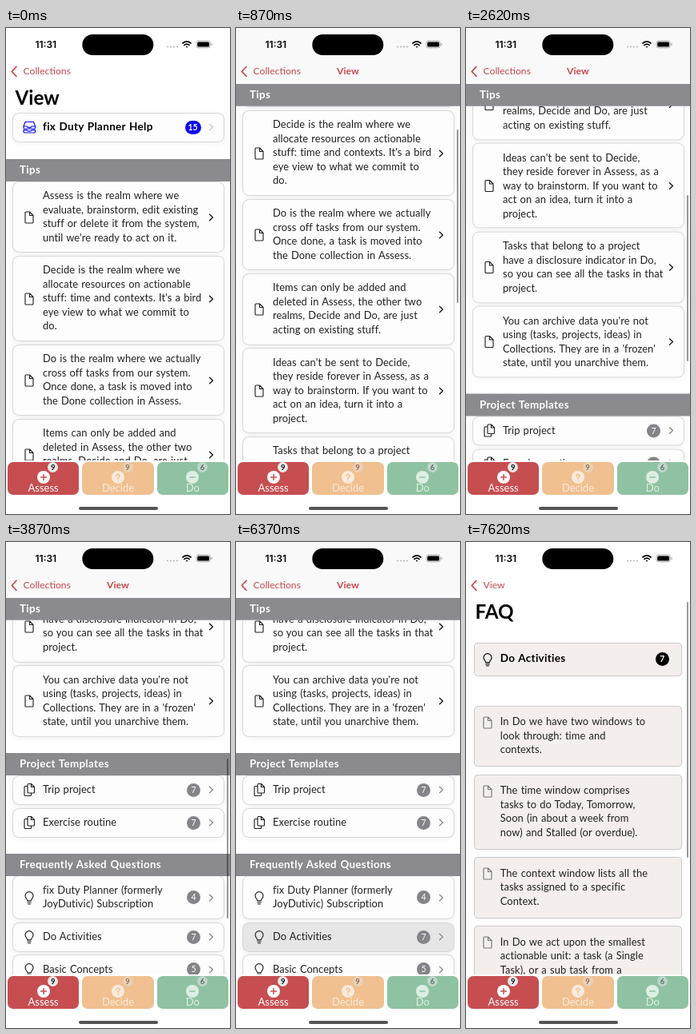
Recreate the animation shown at these times as an HTML page. Size 280 by 608 pixels, loop 8000 ms.

```html
<!DOCTYPE html>
<html lang="en">
<head>
<meta charset="utf-8">
<title>Task tips</title>
<style>
html, body { margin: 0; width: 100%; height: 100%; overflow: hidden; background: #fff; }
body { position: relative; font: 12.9px/17.5px Lato, "Open Sans", sans-serif; color: #202020; letter-spacing: .06px; word-spacing: .8px; }
body * { box-sizing: border-box; }
svg { position: absolute; overflow: visible; fill: none; stroke: currentColor; stroke-linecap: round; stroke-linejoin: round; }
.abs, .page, .bar { position: absolute; }
.page { inset: 0; width: 280px; height: 541px; overflow: hidden; background: #fff; }
.title { position: absolute; left: 11.5px; top: 72px; font: 700 24.2px/30px Lato, sans-serif; letter-spacing: 0; color: #000; }
#rows { padding-top: 107px; }
.card { position: relative; margin: 0 0 5.8px 9px; width: 262.5px; padding: 8.3px 0 9.2px 37px; white-space: pre; background: #fdfdfd;
  border-radius: 7px; box-shadow: 0 0 0 .8px #cfcfd2, 0 1px 10px #00000014; }
.card > svg { top: calc(50% - 9px); }
.icon { left: 10.5px; width: 18px; height: 18px; stroke-width: 1.15; }
.more { left: 242px; width: 10px; height: 18px; stroke-width: 1.25; }
.count { position: absolute; left: 217px; top: calc(50% - 8.5px); width: 17px; height: 17px; border-radius: 9px; background: #858488;
  color: #fff; font-size: 10.5px; line-height: 17px; text-align: center; letter-spacing: 0; }
.strong { font-size: 13.5px; font-weight: 700; letter-spacing: .3px; color: #000; }
#rows .strong { margin-bottom: 22px; }
.strong .count { left: 214.5px; width: 20px; background: #0a0af0; }
.head { position: relative; z-index: 2; margin: 21px 0 .5px; height: 28.3px; padding-left: 17px; background: #8b8a8f; color: #fff;
  font-weight: 700; font-size: 13.3px; line-height: 27.4px; letter-spacing: .35px; }
.bar { right: 2px; width: 2.3px; border-radius: 2px; background: #0006; z-index: 3; }
#answers { padding-top: 126.6px; }
#faq .card { margin: 0 0 11.5px 11.3px; width: 257.3px; padding: 10.6px 0 11.4px 31.5px; border-radius: 4px; background: #f4efed; box-shadow: 0 0 0 .8px #bcbcc2, 0 1px 7px #0001; }
#faq .icon { left: 7px; top: 11px; color: #777; }
#faq .strong { margin-bottom: 39px; padding: 10.9px 0 11.6px 31.5px; }
#faq .strong .icon { color: #000; }
#faq .strong .count { left: 225.5px; width: 17px; background: #000; }
#nav { left: 0; top: 0; width: 280px; height: 70px; color: #c9474a; }
#nav span { position: absolute; top: 44.7px; left: 21.5px; font-size: 12.2px; letter-spacing: 0; }
#nav #small { left: 126px; font-weight: 700; }
#tabs { left: 0; top: 541px; width: 280px; height: 67px; background: #fff; }
.tab { position: absolute; top: 1.9px; width: 89.3px; height: 41.5px; border-radius: 7px; color: #fff; text-align: center; padding-top: 24.3px; font-size: 13px; letter-spacing: 0; }
.tab i { position: absolute; left: 50.3px; top: -.3px; width: 13px; height: 13px; border-radius: 7px; font: 700 9.5px/13px Lato, sans-serif; }
.tab svg { left: 36.5px; top: 10.7px; width: 16px; height: 16px; stroke-width: 1.5; }
#home { left: 90.5px; top: 58px; width: 99.5px; height: 3.5px; border-radius: 2px; background: #555; }
</style>
</head>
<body>
<div class="page" id="list">
  <div id="rows"><div class="title">View</div></div>
  <div class="bar" id="listBar"></div>
</div>
<div class="page" id="faq">
  <div class="title">FAQ</div>
  <div id="answers"></div>
  <div class="bar" id="faqBar" style="top:75px;height:320px"></div>
</div>
<div class="abs" id="nav">
  <svg width="280" height="69"><path d="M13 48.3l-5.7 6.1 5.7 6.1" stroke-width="1.6"/></svg>
  <span id="oldBack">Collections</span><span id="newBack">View</span><span id="small">View</span>
</div>
<svg class="abs" style="left:0;top:0" width="280" height="40" color="#000">
  <text x="36.5" y="25" fill="#000" stroke="none" font-family="Inter, sans-serif" font-size="12" font-weight="600" letter-spacing="0" word-spacing="0">11:31</text>
  <rect x="95.3" y="8" width="89" height="26" rx="13" fill="#000" stroke="none"/>
  <path d="M202 23.5h13" stroke="#bbb" stroke-width="2.2" stroke-dasharray="0 4"/>
  <path d="M221 19q5-4.4 10 0M222.9 21.4q3.1-2.6 6.2 0" stroke-width="1.7"/>
  <path d="M224.6 23.3q1.4-1 2.8 0L226 24.8z" fill="#000" stroke="none"/>
  <rect x="238" y="16.2" width="17.3" height="8.6" rx="2.6" stroke="#999" stroke-width=".8"/>
  <rect x="239.2" y="17.4" width="14.9" height="6.2" rx="1.6" fill="#000" stroke="none"/>
  <path d="M257 19.5v2" stroke="#999" stroke-width="1"/>
</svg>
<div class="abs" id="tabs"><div class="abs" id="home"></div></div>
<script>
const $ = id => document.getElementById(id);
const icons = {
  file: "M5 2h4.5l4.5 4.5V15a1 1 0 0 1-1 1H5a1 1 0 0 1-1-1V3a1 1 0 0 1 1-1zM9.5 2v4.5H14",
  docs: "M8 1.5h3.5l4 4V12a1 1 0 0 1-1 1H8a1 1 0 0 1-1-1V2.5a1 1 0 0 1 1-1zM11.5 1.5v4h4M7 4.5H4a1 1 0 0 0-1 1V15.5a1 1 0 0 0 1 1h6.5a1 1 0 0 0 1-1V13",
  bulb: "M6.7 12.8C6.7 10.5 4 9.8 4 6.6a5 5 0 0 1 10 0c0 3.2-2.7 3.9-2.7 6.2zM6.8 15h4.4M7.6 17h2.8",
  tray: "M2 8l2-5.5h10.5l2 5.5v2a1 1 0 0 1-1 1H3a1 1 0 0 1-1-1zM2 8h4.2q.6 1.6 3 1.6t3-1.6h4.3M2 12.6V15a1 1 0 0 0 1 1h12.5a1 1 0 0 0 1-1v-2.4h-4.3q-.6 1.5-3 1.5t-3-1.5z"
};

const icon = (name, color = "") => `<svg class="icon" viewBox="0 0 18 18" style="color:${color}"><path d="${icons[name]}"/></svg>`;
const more = color => `<svg class="more" viewBox="0 0 10 18" style="color:${color}"><path d="M3.5 5.2l4 3.8-4 3.8"/></svg>`;
const count = n => `<div class="count">${n}</div>`;

function add(parent, cls, html) {
  const el = document.createElement("div");
  el.className = cls;
  el.innerHTML = html;
  return parent.appendChild(el);
}
const head = text => add($("rows"), "head", text);
const tip = text => add($("rows"), "card", icon("file") + text + more("#111"));
const row = (name, text, n) => add($("rows"), "card", icon(name) + text + count(n) + more("#888"));
const answer = text => add($("answers"), "card", icon("file") + text);

add($("rows"), "card strong", icon("tray", "#0a0af0") + "fix Duty Planner Help" + count(15) + more("#ccc"));
const tips = head("Tips");
[
  "Assess is the realm where we\nevaluate, brainstorm, edit existing\nstuff or delete it from the system,\nuntil we're ready to act on it.",
  "Decide is the realm where we\nallocate resources on actionable\nstuff: time and contexts. It's a bird\neye view to what we commit to\ndo.",
  "Do is the realm where we actually\ncross off tasks from our system.\nOnce done, a task is moved into\nthe Done collection in Assess.",
  "Items can only be added and\ndeleted in Assess, the other two\nrealms, Decide and Do, are just\nacting on existing stuff.",
  "Ideas can't be sent to Decide,\nthey reside forever in Assess, as a\nway to brainstorm. If you want to\nact on an idea, turn it into a\nproject.",
  "Tasks that belong to a project\nhave a disclosure indicator in Do,\nso you can see all the tasks in that\nproject.",
  "You can archive data you're not\nusing (tasks, projects, ideas) in\nCollections. They are in a 'frozen'\nstate, until you unarchive them."
].forEach(tip);
head("Project Templates");
row("docs", "Trip project", 7);
row("docs", "Exercise routine", 7);
head("Frequently Asked Questions");
row("bulb", "fix Duty Planner (formerly\nJoyDutivic) Subscription", 4);
const picked = row("bulb", "Do Activities", 7);
row("bulb", "Basic Concepts", 5);

add($("answers"), "card strong", icon("bulb") + "Do Activities" + count(7));
[
  "In Do we have two windows to\nlook through: time and\ncontexts.",
  "The time window comprises\ntasks to do Today, Tomorrow,\nSoon (in about a week from\nnow) and Stalled (or overdue).",
  "The context window lists all the\ntasks assigned to a specific\nContext.",
  "In Do we act upon the smallest\nactionable unit: a task (a Single\nTask), or a sub task from a\nproject."
].forEach(answer);

// label, left, fill, badge fill, badge ink, badge count, foreground, sign
[
  ["Assess", 2, "#c64e51", "#e9e9e9", "#111", 9, "#fff", "M4.5 8h7M8 4.5v7"],
  ["Decide", 95.3, "#f0c090", "#ead0b8", "#95704f", 9, "#faeadb", "M6 6.4q.2-1.8 2-1.8t2 1.7q0 1-1.2 1.6T8 9.4M8 11.6v.1"],
  ["Do", 188.7, "#8fc2a2", "#bfd6c8", "#557563", 6, "#dceee3", "M4.8 8h6.4"]
].forEach(([label, left, fill, badge, ink, n, fg, sign]) => {
  const tab = add($("tabs"), "tab", `<i style="background:${badge};color:${ink}">${n}</i>
    <svg viewBox="0 0 16 16"><circle cx="8" cy="8" r="8" fill="${fg}" stroke="none"/><path d="${sign}" stroke="${fill}"/></svg>${label}`);
  tab.style.cssText = `left:${left}px;background:${fill};color:${fg}`;
});

const clamp = v => Math.min(1, Math.max(0, v));
const easeOut = (t, from, to, power) => 1 - (1 - clamp((t - from) / (to - from))) ** power;
// start, end, distance of each flick
const flicks = [[375, 1000, 185.3], [1875, 2625, 253.2], [3250, 3875, 193.5]];
const LOOP = 8000, STEP = 125;

function draw(now) {
  // the screen refreshes eight times a second
  const t = Math.floor((now % LOOP + 5) / STEP) * STEP % LOOP;
  const y = flicks.reduce((sum, [from, to, d]) => sum + d * easeOut(t, from, to, 2.5), 0);
  const push = easeOut(t, 6400, 7000, 3);
  const collapsed = y > 35 ? 1 - push : 0;

  $("rows").style.transform = `translateY(${-y}px)`;
  tips.style.transform = `translateY(${Math.max(0, y - 94.3)}px)`;
  picked.style.background = t >= 6375 ? "#e6e6e6" : "";

  const bar = $("listBar").style;
  bar.top = 69 + .32 * y + "px";
  bar.height = 224 - .038 * y + "px";
  bar.opacity = t < 500 ? 0 : 1 - clamp((t - 4875) / 375);

  $("list").style.transform = `translateX(${-84 * push}px)`;
  $("list").style.filter = `brightness(${1 - .1 * push})`;
  $("faq").style.transform = `translateX(${280 * (1 - push)}px)`;
  $("faqBar").style.opacity = t >= 7000 ? 1 : 0;

  $("nav").style.background = `hsl(0 0% ${100 - 2.4 * collapsed}%)`;
  $("oldBack").style.opacity = 1 - push;
  $("newBack").style.opacity = push;
  $("newBack").style.transform = `translateX(${104 * (1 - push)}px)`;
  $("small").style.opacity = collapsed;
  $("small").style.transform = `translateX(${-104 * push}px)`;
}

const start = performance.now();
function loop() {
  draw(performance.now() - start);
  requestAnimationFrame(loop);
}
loop();
</script>
</body>
</html>
```
